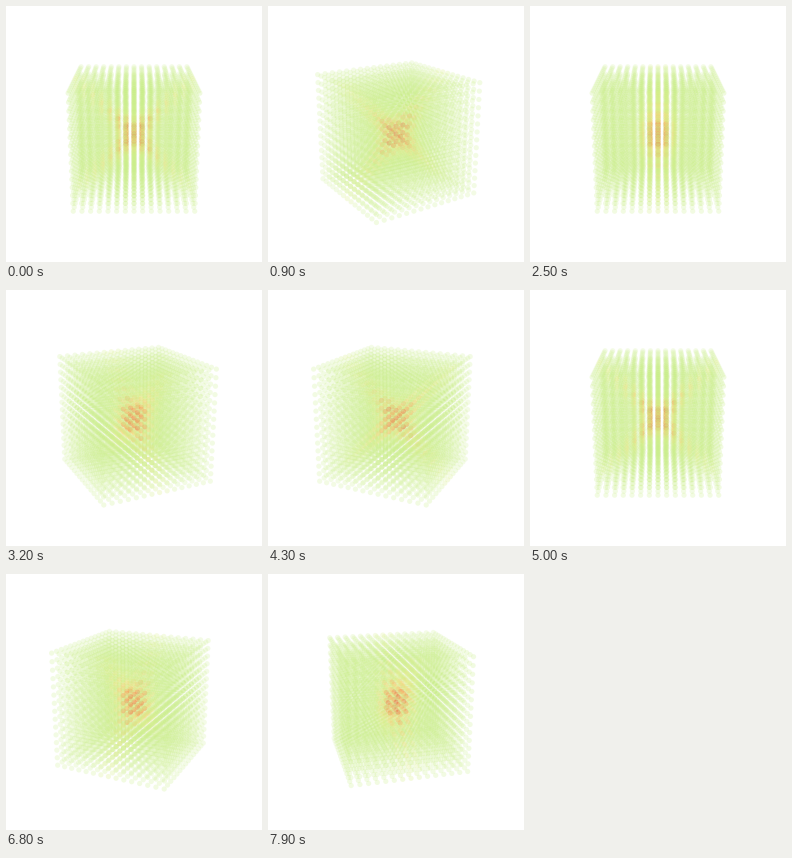
These frames come from a looping animation (256x256 px, 8 s). A matplotlib script:

```python
import numpy as np
import matplotlib.pyplot as plt
from matplotlib.animation import FuncAnimation
from matplotlib.colors import LinearSegmentedColormap

SIZE, DPI = 256, 100
FRAMES, INTERVAL = 80, 100
STEP = np.radians(3.6)      # turn per frame
ELEV = np.radians(19)
DIST, FOCAL = 9.0, 509.0    # camera distance and scale, cube half-side = 1
N = 15

# Cubic lattice: u across, v towards the viewer, w up
axis = np.linspace(-1, 1, N)
u, v, w = (g.ravel() for g in np.meshgrid(axis, axis, axis))

# Field with two crossed diagonal arms in the u-w plane, peaking at the centre
radius = np.sqrt(u**2 + v**2 + w**2)
arms = np.exp(-(v / 0.24)**2 - ((np.abs(u) - np.abs(w)) / 0.2)**2 - radius / 0.62)
core = np.exp(-(radius / 0.3)**2)
value = np.clip(0.85 * arms + 0.45 * core, 0, 1)

cmap = LinearSegmentedColormap.from_list("heat", [
    (0.0, (0.78, 0.935, 0.51)),
    (0.12, (0.88, 0.93, 0.50)),
    (0.28, (1.0, 0.84, 0.48)),
    (0.55, (0.99, 0.60, 0.32)),
    (1.0, (0.93, 0.30, 0.18)),
])
colors = cmap(value)
alpha = 0.25 + 0.35 * np.clip(value * 1.6, 0, 1)

fig = plt.figure(figsize=(SIZE / DPI, SIZE / DPI), dpi=DPI, facecolor="white")
ax = fig.add_axes([0, 0, 1, 1])
ax.set_xlim(0, SIZE)
ax.set_ylim(SIZE, 0)
ax.axis("off")
dots = ax.scatter(u, w, s=14, c=colors, linewidths=0)


def project(angle):
    """Return screen x, y and nearness after turning about the upright axis."""
    c, s = np.cos(angle), np.sin(angle)
    side, front = u * c + v * s, v * c - u * s
    near = front * np.cos(ELEV) + w * np.sin(ELEV)
    up = w * np.cos(ELEV) - front * np.sin(ELEV)
    scale = FOCAL / (DIST - near)
    return SIZE / 2 + side * scale, SIZE / 2 - up * scale, near


def update(i):
    x, y, near = project(i * STEP)
    order = np.argsort(near)
    shade = 0.65 + 0.35 * (near - near.min()) / np.ptp(near)
    rgba = colors.copy()
    rgba[:, 3] = alpha * shade
    dots.set_offsets(np.column_stack([x, y])[order])
    dots.set_facecolors(rgba[order])
    return (dots,)


anim = FuncAnimation(fig, update, frames=FRAMES, interval=INTERVAL,
                     repeat=True, repeat_delay=0, blit=False)
plt.show()
```
